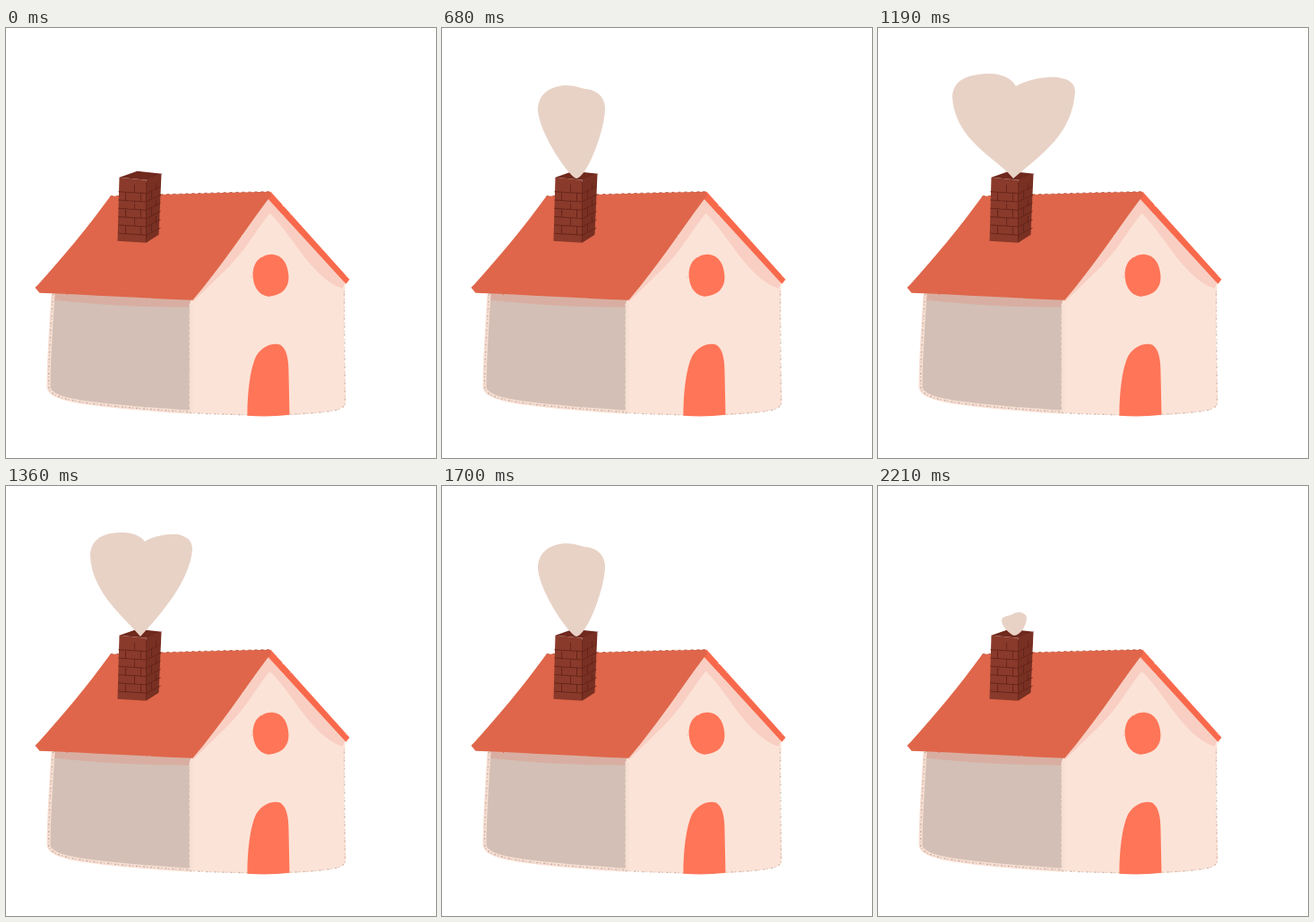
Animation, 480 px wide and 480 px high, one loop 2.38 s. Source, as an HTML page:

```html
<!DOCTYPE html>
<html lang="en">
<head>
<meta charset="utf-8">
<title>Little house</title>
<style>
  html, body { margin: 0; width: 100%; height: 100%; overflow: hidden; background: #fff; }
  svg { display: block; width: 100%; height: 100%; }
</style>
</head>
<body>
<svg viewBox="0 0 480 480">
  <defs>
    <filter id="rough" color-interpolation-filters="sRGB">
      <feTurbulence type="fractalNoise" baseFrequency=".35" numOctaves="2" seed="4"/>
      <feDisplacementMap in="SourceGraphic" scale="1.6" xChannelSelector="R" yChannelSelector="G"/>
    </filter>
  </defs>

  <g id="house" filter="url(#rough)" transform="translate(-.5 -.3)">
    <!-- walls -->
    <path fill="#d3bfb5" d="M53 294L209 303L207 430C160 427 105 423 75 417C56 412 48 408 47 402C47 370 52 330 53 294Z"/>
    <path fill="#d9aea2" d="M54 294L209 301L208 312C150 312 100 309 54 304Z"/>
    <path fill="#fce3d7" d="M294 192L379 286L378 350L380 418Q379 425 368 427C345 431 318 433 290 433C260 433 235 431 206 430L206 306Z"/>
    <path fill="#f9cfc3" d="M294 190L380 283L376 291C360 286 347 272 336 259C322 241 310 222 295 207C279 227 267 249 249 267L209 306L208 299Z"/>
    <g id="edges" fill="none"></g>

    <!-- roof -->
    <path fill="#f8694c" d="M291 183L296 183L384 281L380 286L293 191Z"/>
    <path fill="#df664a" d="M117 188C175 186 235 184 294 183L297 187L292 193C267 226 240 268 209 304C155 302 95 298 38 296L33 290L37 286C63 257 91 224 117 188Z"/>
    <path fill="none" stroke="#a94432" stroke-width=".8" stroke-dasharray="3 4" d="M117 188C175 186 235 184 294 183"/>

    <!-- window and door -->
    <path fill="#ff7558" d="M296 253C309 253 315 263 316 278C316 292 307 299 293 300C281 298 276 287 276 274C277 260 285 254 296 253Z"/>
    <path fill="#ff7558" d="M270 433C270 407 273 380 280 366C287 355 299 351 307 354C314 359 316 370 316 385L317 432Q293 435 270 433Z"/>

    <!-- chimney -->
    <path fill="#8a3a2a" d="M127 167L157 170L157 240L125 238Z"/>
    <path fill="#783022" d="M157 170L174 163L171 231L157 240Z"/>
    <path fill="#70291d" d="M127 167L147 160L175 163L158 170Z"/>
    <path id="bricks" fill="none" stroke="#64231a" stroke-width=".9"/>
  </g>

  <path id="smoke" fill="#e8d2c6"/>
</svg>
<script>
const STEP = 170, COUNT = 14;
const $ = id => document.getElementById(id);

// smoke growing from a puff into a heart
const SHAPES = [
  '',
  'M152 167C146 165 138 156 138 150C139 144 147 146 152 142C157 140 165 141 166 147C166 155 160 166 152 167Z',
  'M152 170C143 168 127 154 126 143C126 131 140 126 153 124C166 125 174 132 174 141C173 155 162 168 152 170Z',
  'M150 168C138 166 112 137 110 112C110 99 124 95 138 95C156 96 170 104 170 119C170 140 161 166 150 168Z',
  'M150 168C141 165 109 118 107 92C107 74 120 65 138 64C149 64 154 67 160 68C174 69 182 78 182 90C182 112 163 166 150 168Z',
  'M150 169C144 166 109 105 108 79C109 61 120 55 135 55C147 55 152 58 156 60C162 56 170 53 180 54C191 55 195 62 195 71C194 90 177 119 170 138C163 158 155 169 150 169Z',
  'M150 168C137 151 95 120 94 77C95 57 112 51 133 52C146 53 152 58 155 62C164 56 180 53 192 54C204 57 208 62 208 71C205 106 174 142 150 168Z',
  'M151 168C137 148 86 127 83 77C84 58 99 51 127 51C142 52 150 58 154 65C166 58 185 54 200 55C214 57 220 62 220 71C217 118 184 140 151 168Z'
];

function bricks() {
  let d = '';
  for (let row = 0; row < 6; row++) {
    const y = 184 + row * 9.3;
    d += `M126 ${y - 1}L157 ${y + 1}L173 ${y - 7}`;
    for (let x = row % 2 ? 134 : 144; x < 156; x += 17) d += `M${x} ${y}v-9`;
    d += `M${row % 2 ? 163 : 168} ${y - 3}v-8`;
  }
  return d + 'M157 172V239';
}

// chalky lines along the wall edges
function chalk(d, color, width, dash) {
  $('edges').insertAdjacentHTML('beforeend',
    `<path d="${d}" stroke="${color}" stroke-width="${width}" stroke-dasharray="${dash}"/>`);
}

const LEFT = 'M53 297C51 330 48 370 48 401C49 409 60 413 75 416C105 422 160 426 206 429';
const FRONT = 'M206 430C260 433 340 433 368 427Q379 425 379 418L378 290';
chalk(LEFT, '#f8dfd3', 4, 'none');
chalk(LEFT, '#c2aca1', 1.3, '2 2 1 3');
chalk('M207 308L207 429', '#f8dfd3', 4, '6 1 3 1');
chalk('M205 310L205 428', '#d3bfb5', 1, '2 4');
chalk(FRONT, '#ccb5a9', 1.3, '2 2 1 4');
$('bricks').setAttribute('d', bricks());

let shown = -1;
function draw(now) {
  const step = Math.floor(now / STEP) % COUNT;
  const i = Math.min(step, COUNT - step);
  if (i !== shown) $('smoke').setAttribute('d', SHAPES[shown = i]);
}

let start;
function tick(now) {
  start ??= now;
  draw(now - start);
  requestAnimationFrame(tick);
}
requestAnimationFrame(tick);
</script>
</body>
</html>
```
